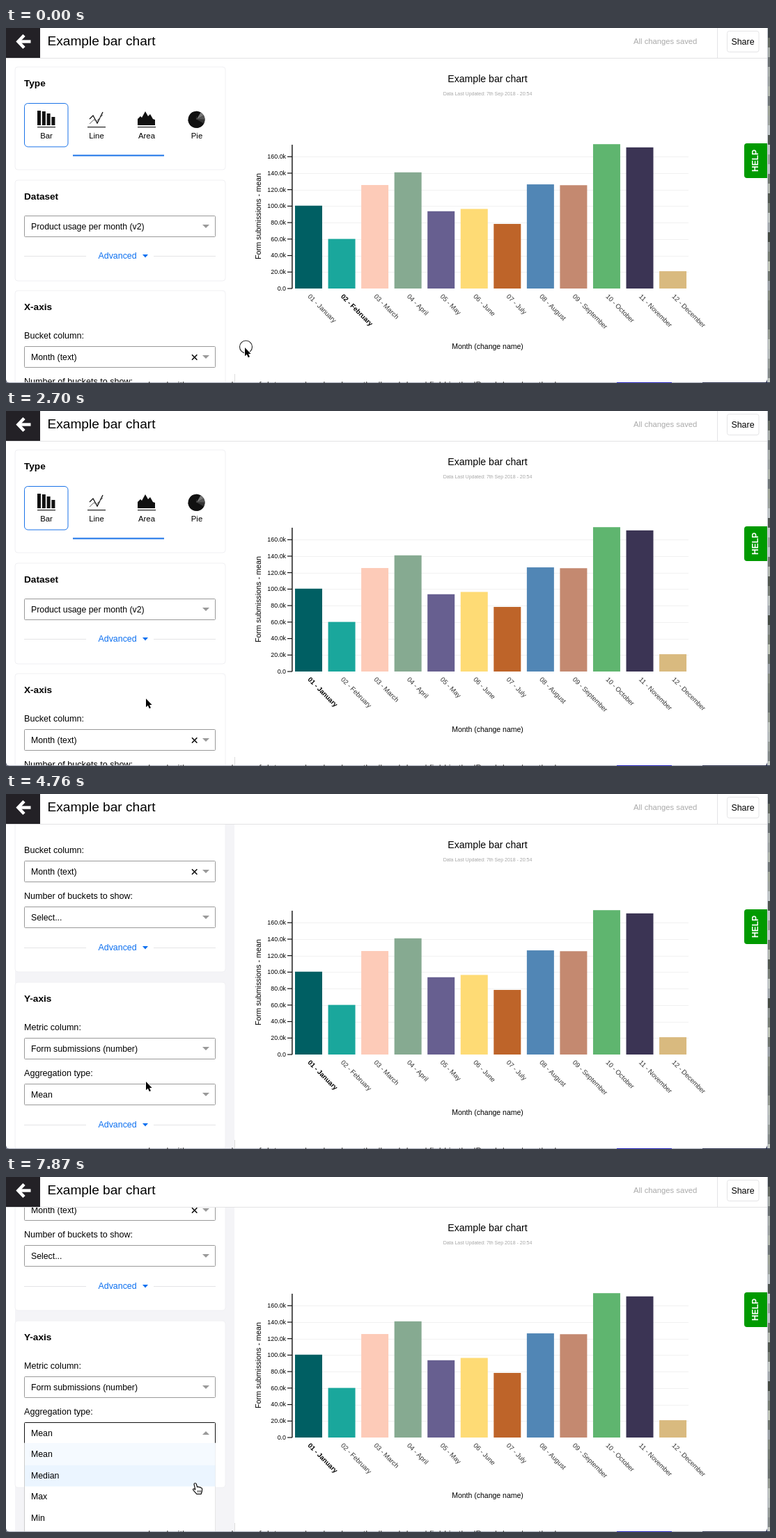
Animation of 1097 by 511 pixels, one loop 8 s. Source, as an HTML page with a canvas:

```html
<!DOCTYPE html>
<html lang="en">
<head>
<meta charset="utf-8">
<title>Example bar chart</title>
<style>
html, body { margin: 0; width: 100%; height: 100%; overflow: hidden; background: #fff; }
canvas { display: block; }
</style>
</head>
<body>
<canvas id="stage" width="1097" height="511"></canvas>
<script>
const ctx = document.getElementById('stage').getContext('2d');
const LOOP = 8000, STEP = 148, FIRST = 24;
const FONT = '"Liberation Sans", Arial, sans-serif';
const BLUE = '#0b6ff0';
const BASE = 375, PER_K = 1.186, BAR_W = 39, PITCH = 47.55;

const BARS = [
  ['January', 100.55, '#005f63'], ['February', 60.2, '#1aa79c'], ['March', 125.6, '#fdcbb8'],
  ['April', 141, '#86aa91'], ['May', 93.8, '#675f90'], ['June', 96.6, '#fedb75'],
  ['July', 78.4, '#be6429'], ['August', 126.4, '#5186b5'], ['September', 125.4, '#c48970'],
  ['October', 175.2, '#5fb56f'], ['November', 171.3, '#3b3454'], ['December', 21, '#d9ba7f']
].map(([name, value, color], i) => ({
  label: String(i + 1).padStart(2, '0') + ' - ' + name,
  color, value, x: 415 + i * PITCH, h: value * PER_K
}));

// start time, end time, destination
const POINTER = [
  [0, 0, 343, 460], [460, 1200, 452, 332], [1500, 1940, 497, 333], [2250, 2680, 201, 414],
  [5060, 5640, 94, 337], [5640, 5940, 24, 342], [5940, 6240, 88, 362],
  [6250, 6980, 288, 365], [7430, 7860, 272, 441]
];
const SCROLL = [[0, 0, 0], [3100, 3720, 168], [4490, 5030, 426]];
const MENU_OPENS = 7100;
const AGGREGATIONS = ['Mean', 'Median', 'Max', 'Min'];
const MENU_TOP = 810, OPTION_H = 30.7;

const HAND = new Path2D('M-2 1.2C-2-.6 1-.8 1.3 1L2.6 5.4C3.6 4.4 5 4.8 5.3 5.8C6.3 5 7.6 5.5 7.8 6.6' +
  'C9 6.2 9.6 7.2 9.6 8.4L9.4 11.5L8.2 15.3H1.8L-3 9.8C-4.4 8-2.4 7-1 8.6L-.2 9Z');
const ARROW = new Path2D('M0 0V12.2L2.8 9.7L4.8 14.2L6.9 13.3L5 8.9H8.6Z');

const clamp = v => Math.max(0, Math.min(1, v));
const smooth = p => p * p * (3 - 2 * p);
const easeOut = p => 1 - (1 - p) ** 2;
const snap = t => Math.max(0, FIRST + STEP * Math.floor((t - FIRST) / STEP));

// Runs through the moves and gives coordinate k at time t.
function follow(moves, k, t, ease) {
  return moves.reduce((v, m) => t < m[0] ? v : v + (m[k] - v) * ease(clamp((t - m[0]) / (m[1] - m[0] || 1))), moves[0][k]);
}
const pointerAt = t => [2, 3].map(k => follow(POINTER, k, t, smooth));
const scrollAt = t => Math.round(follow(SCROLL, 2, t, easeOut));

const barUnder = (x, y) =>
  BARS.findIndex(b => x >= b.x && x <= b.x + BAR_W && y <= BASE && y >= BASE - b.h);

function scrollbarAlpha(t) {
  const [start, end] = SCROLL.filter(m => m[0] <= t).pop();
  return !end || t - start < 300 ? 0 : clamp((600 - (t - end)) / 280);
}

// The last bar touched keeps its label bold.
function boldBar(t) {
  let bold = 1;
  for (let s = FIRST; s <= t; s += STEP) {
    const i = barUnder(...pointerAt(s));
    if (i >= 0) bold = i;
  }
  return bold;
}

function stateAt(time) {
  const t = snap(time);
  const [x, y] = pointerAt(t).map(Math.round);
  const offset = scrollAt(t), open = t >= MENU_OPENS;
  const pageY = y + offset, settled = scrollAt(t - 290) === offset;
  const bar = barUnder(x, y);
  const onLink = settled && x > 130 && x < 206 && Math.abs(pageY - 583) < 10;
  const onSelect = x > 26 && x < 301 && pageY > 779 && (open || pageY < MENU_TOP);
  const focus = open ? Math.max(0, Math.floor((pageY - MENU_TOP) / OPTION_H)) : -1;
  return {
    x, y, offset, open, bar, onLink, focus,
    hand: bar >= 0 || onLink || onSelect,
    thumb: scrollbarAlpha(t), bold: boldBar(t), pressed: time < 150
  };
}

function rect(x, y, w, h, color) {
  ctx.fillStyle = color;
  ctx.fillRect(x, y, w, h);
}

function paint(fill, stroke, width = 1) {
  if (fill) { ctx.fillStyle = fill; ctx.fill(); }
  if (stroke) { ctx.strokeStyle = stroke; ctx.lineWidth = width; ctx.stroke(); }
}

function round(x, y, w, h, r, fill, stroke) {
  ctx.beginPath();
  ctx.roundRect(x, y, w, h, r);
  paint(fill, stroke);
}

function poly(points, fill, stroke, width) {
  ctx.beginPath();
  for (let i = 0; i < points.length; i += 2) ctx.lineTo(points[i], points[i + 1]);
  paint(fill, stroke, width);
}

function text(str, x, y, size, { color = '#000', align = 'left', bold = false } = {}) {
  ctx.font = (bold ? 'bold ' : '') + size + 'px ' + FONT;
  ctx.textAlign = align;
  ctx.fillStyle = color;
  ctx.fillText(str, x, y);
  return ctx.measureText(str).width;
}

function turned(str, x, y, angle, size, style) {
  ctx.save();
  ctx.translate(x, y);
  ctx.rotate(angle);
  text(str, 0, 0, size, style);
  ctx.restore();
}

function triangle(x, y, w, h, color) {
  poly([x - w / 2, y - h / 2, x + w / 2, y - h / 2, x, y + h / 2], color);
}

const heading = (str, y) => text(str, 26, y + 5, 13.6, { bold: true });
const label = (str, y) => text(str, 26, y + 4, 12.6);

function select(str, y, { clear, open } = {}) {
  round(26.5, y - 15.5, 274, 30, 1, '#fff', open ? '#111' : '#999');
  text(str, 36, y + 4, 12.3);
  triangle(287, y - .5, 10, open ? -5 : 5, '#999');
  if (clear) for (const d of [-3.7, 3.7]) poly([267, y - d, 274.4, y + d], null, '#000', 1.5);
}

function advanced(y, hover) {
  const color = hover ? '#2f84f2' : BLUE;
  for (const x of [26, 212]) rect(x, y, 89, 1, '#e4e4e6');
  text('Advanced', 132.5, y + 4, 12.4, { color });
  triangle(200, y + .3, 8, 4.5, color);
}

function card(top, height, title) {
  round(13, top, 302, height, 4, '#fff', '#f0f0f3');
  heading(title, top + 22.5);
}

function axisCard(top, title, fields, hover) {
  card(top, 240, title);
  fields.forEach(([name, value, options], i) => {
    label(name, top + 65 + i * 66);
    select(value, top + 96 + i * 66, options);
  });
  advanced(top + 205, hover);
}

function typeIcons() {
  round(26.5, 108.5, 62.5, 62.5, 5, '#fff', '#1a73e8');
  ['Bar', 'Line', 'Area', 'Pie'].forEach((name, i) => {
    const x = 58 + i * 72;
    text(name, x, 159, 11.3, { align: 'center' });
    if (i < 3) rect(x - 13, 142, 26, 1.2, '#222');
  });
  for (let i = 0; i < 4; i++) rect(45 + i * 6.8, 119 + i * i, 5, 21 - i * i, '#111');

  poly([120, 131, 125, 126, 131, 137, 139, 121], null, '#111', 1.3);
  poly([120, 138, 126, 132, 130, 134, 139, 125], null, '#666');
  poly([189, 140, 189, 131, 193, 127, 195, 129, 200, 120, 204, 127, 207, 124, 211, 131, 214, 132, 214, 140], '#111');

  for (let i = 0; i < 4; i++) {
    ctx.beginPath();
    ctx.moveTo(273.5, 131.8);
    ctx.arc(273.5, 131.8, 12, (i - 3) * .52, i ? (i - 2) * .52 : 3.15);
    paint(['#111', '#777', '#555', '#333'][i]);
  }
  ctx.beginPath();
  ctx.moveTo(273.5, 131.8);
  ctx.arc(273.5, 131.8, 12, .5, 4.8);
  paint('#111');
  rect(96, 182.5, 131, 2, '#1a73e8');
}

function menu(focus) {
  rect(26, MENU_TOP - 1, 275, 130, '#ccc');
  rect(27, MENU_TOP - 1, 273.5, 130, '#fff');
  rect(27, MENU_TOP - 1, 273.5, OPTION_H + 1, '#f5faff');
  rect(27, MENU_TOP + focus * OPTION_H, 273.5, OPTION_H, '#ebf5ff');
  AGGREGATIONS.forEach((name, i) => text(name, 36, Math.round(MENU_TOP + 19 + i * OPTION_H), 12.3));
}

function panel(s) {
  ctx.save();
  ctx.beginPath();
  ctx.rect(0, 44, 328, 466);
  ctx.clip();
  if (s.offset) rect(13, 44, 315, 466, '#f4f4f7');
  ctx.translate(0, -s.offset);

  card(56, 148, 'Type');
  typeIcons();
  card(219, 145, 'Dataset');
  select('Product usage per month (v2)', 286);
  advanced(328);
  axisCard(378, 'X-axis', [
    ['Bucket column:', 'Month (text)', { clear: true }],
    ['Number of buckets to show:', 'Select...']
  ], s.onLink);
  axisCard(633, 'Y-axis', [
    ['Metric column:', 'Form submissions (number)'],
    ['Aggregation type:', 'Mean', { open: s.open }]
  ]);
  if (s.open) menu(s.focus);
  ctx.restore();

  ctx.globalAlpha = s.thumb;
  round(320, 44 + s.offset * .526, 6.5, 241, 3.2, '#7d7d81');
  ctx.globalAlpha = 1;
}

function header() {
  rect(0, 43, 1093, 1, '#e2e2e4');
  rect(0, 0, 49, 43, '#232126');
  poly([26, 10.5, 17.5, 19.5, 26, 28.5], null, '#fff', 4.6);
  rect(18, 17.3, 17.5, 4.4, '#fff');
  text('Example bar chart', 59.5, 25, 19.1);
  text('All changes saved', 901, 23, 11.25, { color: '#aaa' });
  rect(1021, 0, 1, 43, '#e4e4e6');
  round(1035.5, 4.5, 45.5, 30, 3, '#fff', '#e4e4e6');
  text('Share', 1058, 24, 12.4, { align: 'center' });
}

function chart(bold) {
  text('Example bar chart', 691.5, 78, 14.1, { align: 'center' });
  text('Data Last Updated: 7th Sep 2018 - 20:54', 691.5, 97, 7, { align: 'center', color: '#a6a6a6' });
  for (let k = 0; k <= 160; k += 20) {
    const y = BASE - k * PER_K;
    if (k) rect(411, Math.round(y), 569, 1, '#f1f1f1');
    rect(404, y - .6, 7, 1.2, '#111');
    text(k.toFixed(1) + (k ? 'k' : ''), 402, Math.round(y + 2.9), 8.9, { align: 'right' });
  }
  rect(410.2, 168, 1.4, BASE - 168, '#111');
  BARS.forEach((b, i) => {
    rect(b.x, BASE - b.h, BAR_W, b.h, b.color);
    turned(b.label, b.x + 17.7, 387, Math.PI / 4, 9.6,
      { bold: i === bold, color: i === bold ? '#000' : '#333' });
  });
  turned('Form submissions - mean', 366, 271, -Math.PI / 2, 10.8, { align: 'center' });
  text('Month (change name)', 691.5, 462, 10.5, { align: 'center' });
}

function tooltip(b, x, y) {
  const value = ': ' + (b.value * 1000 + .25).toFixed(2);
  ctx.font = 'bold 12.3px ' + FONT;
  const nameW = ctx.measureText(b.label).width;
  ctx.font = '12.3px ' + FONT;
  ctx.save();
  ctx.shadowColor = 'rgba(0,0,0,.35)';
  ctx.shadowBlur = 4;
  ctx.shadowOffsetY = 1;
  round(x, y, nameW + ctx.measureText(value).width + 20, 26, 3, '#fff');
  ctx.restore();
  text(b.label, x + 10, y + 17, 12.3, { bold: true });
  text(value, x + 10 + nameW, y + 17, 12.3);
}

function desktopEdge() {
  let seed = 7;
  const random = () => (seed = seed * 16807 % 2147483647) / 2147483647;
  for (let y = 0; y < 511; y += 14) {
    const light = 60 + random() * 140;
    rect(1093, y, 4, 14, `rgb(${light},${light + 6},${light + random() * 20 - 8})`);
  }
  rect(1093, 0, 1, 511, '#c9ccd4');

  rect(328, 498, 1, 12, '#ddd');
  rect(0, 510, 1097, 1, '#a9adba');
  ctx.save();
  ctx.beginPath();
  ctx.rect(200, 508, 600, 3);
  ctx.clip();
  text("Load with one more layer of data, go ahead and use the 'breakdown' field in the 'Breakdown' method",
    204, 518, 13.2, { color: '#444' });
  ctx.restore();
  rect(877, 510, 79, 1, '#1717b4');
  rect(1000, 510, 97, 1, '#2d3350');
  poly([0, 506, 1.5, 509.5, 5, 511, 0, 511], '#6c7080');
  poly([1093, 506, 1091.5, 509.5, 1088, 511, 1093, 511], '#2d3350');
}

function help() {
  round(1060, 166, 33, 50, [4, 0, 0, 4], '#009a00');
  turned('HELP', 1080, 191, -Math.PI / 2, 12, { align: 'center', bold: true, color: '#fff' });
}

function pointer(s) {
  if (s.bar >= 0) tooltip(BARS[s.bar], s.x - 1, s.y - 17);
  if (s.pressed) {
    ctx.beginPath();
    ctx.arc(344.5, 459, 9, 0, 7);
    paint(null, '#222', 1.1);
  }
  ctx.save();
  ctx.translate(s.x, s.y);
  ctx.lineJoin = 'round';
  if (s.hand) {
    ctx.fillStyle = '#fff';
    ctx.fill(HAND);
    ctx.strokeStyle = '#111';
    ctx.lineWidth = 1.2;
    ctx.stroke(HAND);
    for (const x of [3.2, 5.2, 7.2]) rect(x, 10, .8, 3, '#111');
  } else {
    ctx.strokeStyle = '#fff';
    ctx.lineWidth = 2;
    ctx.stroke(ARROW);
    ctx.fillStyle = '#000';
    ctx.fill(ARROW);
  }
  ctx.restore();
}

function draw(t) {
  const s = stateAt(t);
  rect(0, 0, 1097, 511, '#fff');
  panel(s);
  header();
  chart(s.bold);
  desktopEdge();
  help();
  pointer(s);
}

const start = performance.now();
function tick() {
  draw((performance.now() - start) % LOOP);
  requestAnimationFrame(tick);
}
tick();
</script>
</body>
</html>
```
